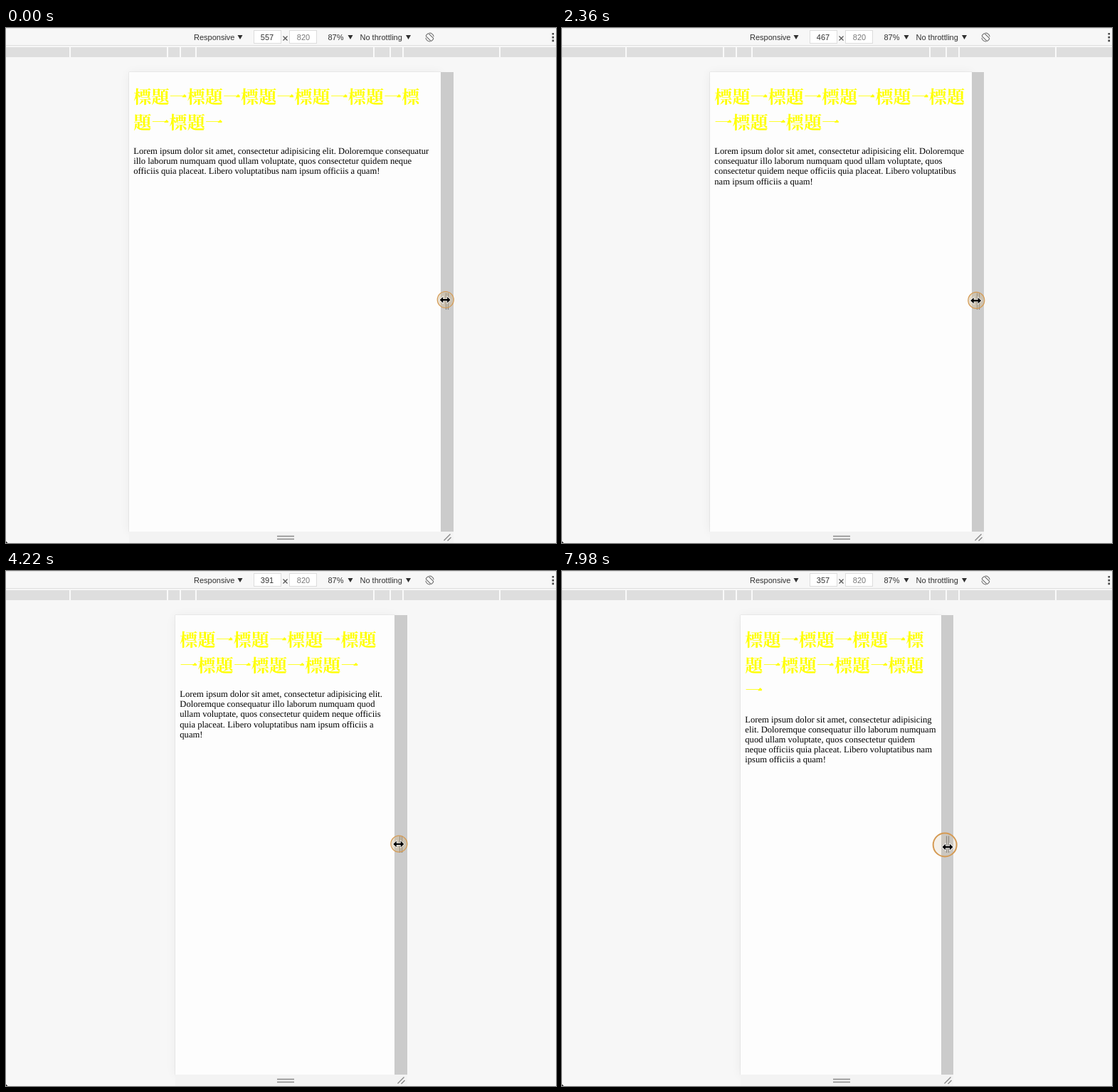
Write an HTML page that moves like this. It is 773x724 px and loops after 8 s.

```html
<!DOCTYPE html>
<html lang="en">
<head>
<meta charset="utf-8">
<title>Responsive heading</title>
<style>
  html, body { margin: 0; width: 100%; height: 100%; overflow: hidden; }
  #stage {
    --w: 557;
    --scale: .788;
    --half: calc(var(--w) * var(--scale) * .5px);
    --left: calc(392px - var(--half));
    --right: calc(392px + var(--half));
    position: relative; width: 773px; height: 724px; overflow: hidden;
    background: #f7f7f7;
  }
  #stage > * { position: absolute; }
  .frame {
    left: var(--left); top: 62px; width: calc(var(--half) * 2); height: 646px;
    background: #fdfdfd;
    box-shadow: 0 0 1px rgba(0, 0, 0, .25), 0 1px 14px rgba(0, 0, 0, .06);
  }
  .page {
    left: var(--left); top: 62px; width: calc(var(--w) * 1px - 16px); padding: 0 8px;
    transform: scale(var(--scale)); transform-origin: 0 0;
    font: 16px/18px "Liberation Serif", "Times New Roman", serif;
    color: #000; text-rendering: geometricPrecision;
  }
  h1 {
    margin: 21.4px 0; color: #ff0;
    font: bold 31.9px/45px "Noto Serif CJK TC", "Noto Sans CJK TC", "Noto Sans CJK", serif;
  }
  h1 i { position: relative; font-style: normal; font-weight: 300; }
  h1 i::after {
    content: ""; position: absolute; right: 1px; top: 50%; width: 9px; height: 5px;
    margin-top: -3px; background: #ff0; clip-path: polygon(0 100%, 60% 0, 100% 100%);
  }
  p { margin: 0; }
  .side { left: var(--right); top: 62px; width: 17.5px; height: 646px; background: #cbcbcb; }
  .base { left: var(--left); top: 708px; width: calc(var(--half) * 2 + 17.5px); height: 16px; background: #f3f3f3; }
  .grips { left: var(--right); top: 0; }
  svg { left: 0; top: 0; overflow: visible; }
  svg text { font: 11px "Liberation Sans", Arial, sans-serif; fill: #303030; }
</style>
</head>
<body>
<div id="stage">
  <div class="frame"></div>
  <div class="page">
    <h1></h1>
    <p>Lorem ipsum dolor sit amet, consectetur adipisicing elit. Doloremque consequatur illo laborum numquam quod ullam voluptate, quos consectetur quidem neque officiis quia placeat. Libero voluptatibus nam ipsum officiis a quam!</p>
  </div>
  <div class="base"></div>
  <div class="side"></div>

  <svg class="grips" width="18" height="724" fill="none" stroke="#858585" stroke-width="1.3" style="left: var(--right)">
    <path d="M7.5 372.5V396M10.5 372.5V396M4.5 720.5L13.5 711.5M9.5 721L14.5 716"/>
  </svg>

  <svg width="773" height="724">
    <path d="M0 .5H773" stroke="#e4e4e4"/>
    <path d="M0 24.5H773" stroke="#dedede"/>
    <rect y="27" width="773" height="14" fill="#dedede"/>
    <path id="breaks" stroke="#fafafa" stroke-width="2"/>
    <g fill="#fff" stroke="#dcdcdc">
      <rect x="348.5" y="3.5" width="38" height="18"/>
      <rect x="398.5" y="3.5" width="38" height="18"/>
    </g>
    <text x="264" y="16.5">Responsive</text>
    <text id="size" x="367" y="16.5" text-anchor="middle">557</text>
    <path d="M389.5 11.5L395.5 17.5M395.5 11.5L389.5 17.5" stroke="#555" stroke-width="1.2"/>
    <text x="418" y="16.5" text-anchor="middle" style="fill:#777">820</text>
    <text x="452.5" y="16.5">87%</text>
    <text x="497.5" y="16.5" textLength="auto">No throttling</text>
    <path d="M325.5 10h7l-3.5 6zM480.5 10h7l-3.5 6zM562 10h7l-3.5 6z" fill="#303030"/>
    <g transform="translate(595.5 13) rotate(-45)" fill="none" stroke="#666">
      <rect x="-2.6" y="-5.5" width="5.2" height="11" rx="1.2"/>
      <path d="M-4.5 -3.5A6 6 0 0 0 -3.5 4.8M4.5 3.5A6 6 0 0 0 3.5 -4.8"/>
    </g>
    <path d="M767.5 7h2.6v2.6h-2.6zM767.5 11.8h2.6v2.6h-2.6zM767.5 16.6h2.6v2.6h-2.6z" fill="#444"/>
    <path d="M381 714.5H405M381 718.5H405" stroke="#888" stroke-width="1.3"/>
    <path d="M0 721.5V724H2.5Z" fill="#222"/>
    <circle id="ring" stroke="#d59a52" fill="#cdb58c"/>
    <path id="arrow" d="M-7.5 0L-3 -4.3V-1.2H3V-4.3L7.5 0L3 4.3V1.2H-3V4.3Z"
          fill="#000" stroke="#fff" stroke-width="1.4" paint-order="stroke"/>
  </svg>
</div>
<script>
  const LOOP = 8000;
  const $ = selector => document.querySelector(selector);
  const stage = $('#stage'), size = $('#size'), ring = $('#ring'), arrow = $('#arrow');

  // [time, viewport width]
  const widths = [[0, 557], [840, 521], [1520, 495], [2360, 467], [3240, 426],
                  [4220, 391], [5200, 370], [5860, 360], [6500, 357], [LOOP, 357]];
  const breakpoints = [90, 227, 245, 267, 517, 540, 558, 694];

  $('h1').innerHTML = '標題<i>一</i>'.repeat(7);
  $('#breaks').setAttribute('d', breakpoints.map(x => `M${x} 27v14`).join(''));

  const mix = (a, b, p) => a + (b - a) * p;
  const progress = (t, from, to) => Math.min(1, Math.max(0, (t - from) / (to - from)));

  function track(points, t) {
    const i = points.findIndex(([time]) => time > t);
    const [t0, a] = points[i - 1], [t1, b] = points[i];
    return mix(a, b, progress(t, t0, t1));
  }

  function setAttributes(node, values) {
    for (const name in values) node.setAttribute(name, values[name]);
  }

  function draw(now) {
    const t = now % LOOP;
    const width = Math.round(track(widths, t));
    const right = 392 + width * .394;
    const y = mix(382, 384, progress(t, 0, 5200)) + progress(t, 5200, 7900);
    const release = progress(t, 7780, 7980);

    stage.style.setProperty('--w', width);
    size.textContent = width;
    setAttributes(ring, {
      cx: right + mix(6.3, 5.5, release), cy: y, r: mix(11.5, 16.5, release),
      'fill-opacity': mix(.42, .16, release), 'stroke-width': mix(1.2, 2, release)
    });
    const x = right + mix(5.7, 9.3, release);
    arrow.setAttribute('transform', `translate(${x} ${y + mix(.3, 3, release)})`);
    requestAnimationFrame(draw);
  }
  draw(0);
</script>
</body>
</html>
```
